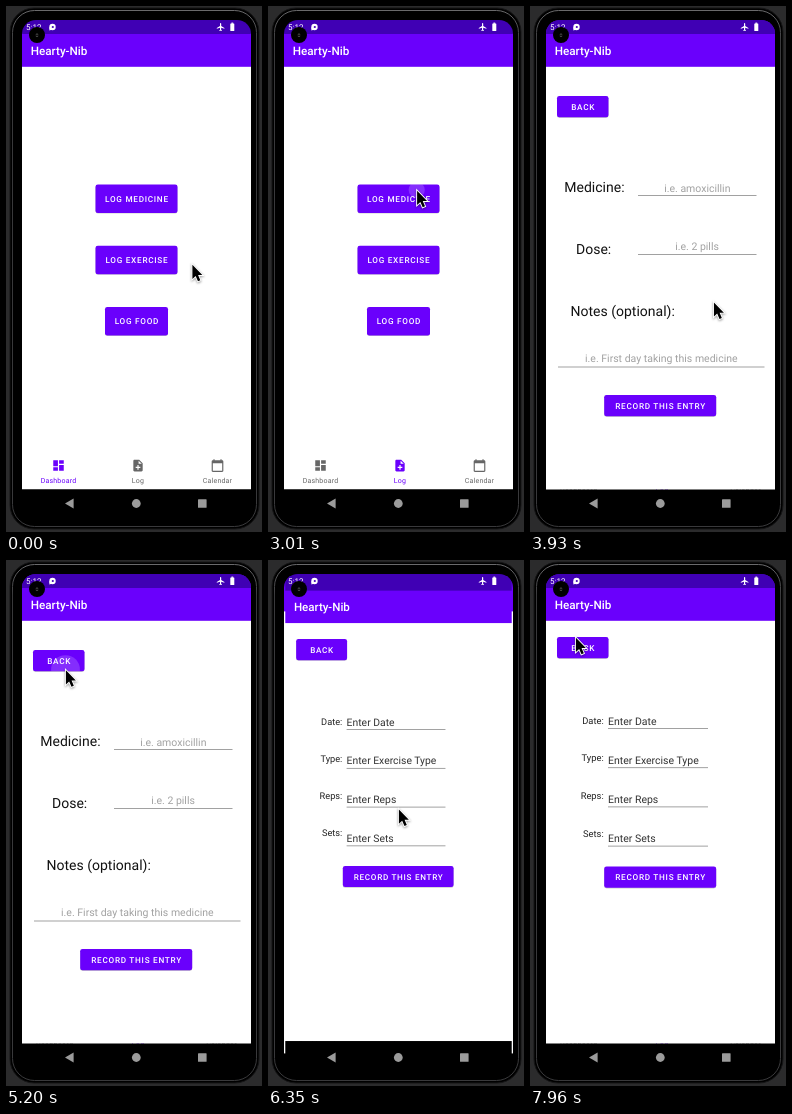
Write an HTML page that moves like this. It is 256 by 526 pixels and loops after 8 s.

```html
<!DOCTYPE html>
<html lang="en">
<head>
<meta charset="utf-8">
<title>Health log</title>
<style>
html, body { margin: 0; width: 100%; height: 100%; overflow: hidden; background: #2b2b2c; }
svg { display: block; width: 100vw; height: 100vh; font-family: Roboto, Arial, sans-serif; text-rendering: geometricPrecision; }
.caps { font-size: 8.2px; font-weight: 500; letter-spacing: .73px; fill: #fff; }
</style>
</head>
<body>
<svg id="stage" viewBox="0 0 256 526"></svg>
<script>
const PURPLE = '#6a00fc', DARK = '#4000b4', GREY = '#666';
const LOOP = 8000, CX = 130.5, CY = 264, NAV = 483.5;
const clamp = (v, a = 0, b = 1) => Math.min(b, Math.max(a, v));
const $ = id => document.getElementById(id);

// Pointer moves: start, end, x, y, sideways bow
const moves = [
  [1030, 1700, 121.5, 459, .07],
  [2150, 2650, 148.7, 184, .04],
  [3780, 4080, 140, 402, -.18],
  [4080, 4330, 112, 242, -.2],
  [4460, 4900, 59.5, 109.5, 0],
  [5420, 5740, 130.5, 248.7, 0],
  [6450, 6760, 163, 395.5, 0],
  [6800, 6860, 188, 341, 0],
  [6880, 7680, 58.5, 77, 0],
  [7700, 7960, 45.5, 77, .9]
];
function pointer(t) {
  let x = 186, y = 258;
  for (const [start, end, tx, ty, bow] of moves) {
    const k = clamp((t - start) / (end - start)), s = k * k * (3 - 2 * k);
    const side = bow * Math.sin(Math.PI * s), dx = tx - x, dy = ty - y;
    x += dx * s - dy * side;
    y += dy * s + dx * side;
  }
  return [x, y];
}

const rect = (x, y, w, h, fill, more = '') =>
  `<rect x="${x}" y="${y}" width="${w}" height="${h}" fill="${fill}" ${more}/>`;
const text = (x, y, size, str, fill = '#111', more = '') =>
  `<text x="${x}" y="${y}" font-size="${size}" fill="${fill}" ${more}>${str}</text>`;
const middle = 'text-anchor="middle"';
const rule = (x, w, y) => rect(x, y - .4, w, .8, '#8a8a8a');

// A touch ripple grows from the pointer and is clipped to the pressed box
const presses = [];
function ripple(t, box, fill = '#fff') {
  const [x, y] = pointer(t);
  presses.push(t);
  return `<clipPath id="clip${t}">${rect(...box, '#000', 'rx="2.3"')}</clipPath>
    <g clip-path="url(#clip${t})"><circle id="rip${t}" cx="${x}" cy="${y}" fill="${fill}"/></g>`;
}

const button = (x, y, w, h, label, press) =>
  rect(x, y + .6, w, h, '#000', 'rx="2.3" opacity=".2"') + rect(x, y, w, h, PURPLE, 'rx="2.3"') +
  `<text class="caps" x="${x + w / 2 + .4}" y="${y + h / 2 + 3.1}" ${middle}>${label}</text>` +
  (press ? ripple(press, [x, y, w, h]) : '');
const backButton = (y, press) => button(27, y, 51.5, 21.3, 'BACK', press);
const recordButton = y => button(74.2, y, 112, 21.3, 'RECORD THIS ENTRY');

const appWindow = (id, body) => `<g id="${id}">` +
  rect(16, 60, 229, NAV - 60, '#fff') + rect(16, 27, 229, 33.8, PURPLE) +
  rect(16, 14, 229, 14, DARK) + rect(16, NAV, 229, 514 - NAV, '#000') +
  text(24.7, 49, 11.7, 'Hearty-Nib', '#fff', 'font-weight="500"') + body + '</g>';

const tab = (id, x, label, icon) => `<g id="${id}" fill="${GREY}">
  <path transform="translate(${x - 7} 452.6) scale(.584)" d="${icon}"/>
  <text x="${x}" y="476.6" font-size="7" letter-spacing=".2" ${middle}>${label}</text></g>`;

const home = appWindow('home',
  button(89.5, 178.5, 82, 28.5, 'LOG MEDICINE', 3010) +
  button(89.5, 239.7, 82, 28.5, 'LOG EXERCISE', 6060) +
  button(99, 301, 63, 28.5, 'LOG FOOD') +
  ripple(2000, [16, 451, 229, 32], '#9c94ac') +
  tab('dash', 52.5, 'Dashboard', 'M3 13h8V3H3zm0 8h8v-6H3zm10 0h8V11h-8zm0-18v6h8V3z') +
  tab('log', 132, 'Log', 'M14 2H6c-1.1 0-2 .9-2 2v16c0 1.1.9 2 2 2h12c1.1 0 2-.9 2-2V8zm2 14h-3v3h-2v-3H8v-2h3v-3h2v3h3zm-3-7V3.5L18.5 9z') +
  tab('cal', 211.5, 'Calendar', 'M20 3h-1V1h-2v2H7V1H5v2H4c-1.1 0-2 .9-2 2v16c0 1.1.9 2 2 2h16c1.1 0 2-.9 2-2V5c0-1.1-.9-2-2-2zm0 18H4V8h16z'));

const hint = (x, y, str) => text(x, y, 10.5, str, '#a2a2a2', middle);
const medicine = appWindow('medicine',
  backButton(90, 5140) +
  text(34.3, 186.3, 14, 'Medicine:') + hint(167.3, 185.6, 'i.e. amoxicillin') + rule(108, 118.5, 189.5) +
  text(46, 247.6, 14, 'Dose:') + hint(167, 244.4, 'i.e. 2 pills') + rule(108, 118.5, 248.5) +
  text(40.5, 309.6, 14, 'Notes (optional):') +
  hint(131.3, 356, 'i.e. First day taking this medicine') + rule(28, 206.5, 361) +
  recordButton(389));

const fields = ['Date:Enter Date', 'Type:Enter Exercise Type', 'Reps:Enter Reps', 'Sets:Enter Sets'];
const exercise = appWindow('exercise',
  backButton(77) +
  fields.map((field, i) => {
    const [label, value] = field.split(':'), y = 164.5 + i * 39.2;
    return text(73.7, y - 1 - i * 1.5, 9.34, label + ':', '#222', 'text-anchor="end"') +
      text(78, y, 10.5, value, '#333') + rule(78, 100, y + 4);
  }).join('') +
  recordButton(306.5));

const system =
  text(20, 24, 8, '5:12', '#fff') +
  '<circle cx="46.5" cy="21" r="3.2" fill="#fff"/><path d="M43.4 21v3.6l3-1z" fill="#fff"/>' +
  `<circle cx="46.8" cy="21" r="1.1" fill="${DARK}"/>` +
  '<path transform="translate(210 16.3) scale(.4)" fill="#fff" d="M21 16v-2l-8-5V3.5a1.5 1.5 0 0 0-3 0V9l-8 5v2l8-2.5V19l-2 1.5V22l3.5-1 3.5 1v-1.5L13 19v-5.5z"/>' +
  rect(224.3, 17.5, 4, 7.4, '#fff', 'rx=".5"') + rect(225.4, 16.6, 1.8, 1.2, '#fff') +
  '<circle cx="31" cy="29" r="8" fill="#000"/>' +
  '<path d="M29.8 28.5q1.2-1.2 2.4 0M29.8 30q1.2 1 2.4 0" stroke="#777" stroke-width=".7" fill="none"/>' +
  '<g fill="#9b9b9b"><path d="M59 497.5L67.6 492.5V502.5Z"/><circle cx="130.3" cy="497.5" r="4.4"/></g>' +
  rect(192, 493.2, 8.6, 8.6, '#9b9b9b', 'rx=".6"');

$('stage').innerHTML =
  '<linearGradient id="rim" x2="0" y2="1"><stop stop-color="#6a6a6c"/><stop offset=".06" stop-color="#39393b"/><stop offset="1" stop-color="#39393b"/></linearGradient>' +
  rect(4, 2, 249, 521, '#000', 'rx="24" stroke="#161617"') +
  rect(6.5, 4.5, 244, 516, '#000', 'rx="22" stroke="url(#rim)"') +
  '<clipPath id="screen">' + rect(16, 14, 229, 500, '#000', 'rx="14"') + '</clipPath>' +
  `<g clip-path="url(#screen)">${home}${medicine}${exercise}</g>${system}` +
  `<g id="cursor"><path d="M0 0V15.2L3.5 12L6 17.7L8.500 16.6L6.1 11H10.7Z" transform="translate(.4 .8) scale(.93)"
    fill="#000" stroke="#fff" stroke-width="2" paint-order="stroke" style="filter:drop-shadow(0 1px 1px #0006)"/></g>`;

// Fast out, extra slow in: two joined cubic curves
const cubic = (a, b, c, d, u) =>
  a * (1 - u) ** 3 + 3 * b * u * (1 - u) ** 2 + 3 * c * u * u * (1 - u) + d * u ** 3;
function ease(x) {
  x = clamp(x);
  const [xs, ys] = x < 1 / 6
    ? [[0, .05, .13333, 1 / 6], [0, 0, .06, .4]]
    : [[1 / 6, .20833, .25, 1], [.4, .82, 1, 1]];
  let lo = 0, hi = 1;
  for (let i = 0; i < 24; i++) {
    const u = (lo + hi) / 2;
    if (cubic(...xs, u) < x) lo = u; else hi = u;
  }
  return cubic(...ys, hi);
}

const forms = [
  { id: 'medicine', open: 3130, close: 5260 },
  { id: 'exercise', open: 6180, close: Infinity }
];
const zoom = (id, s) =>
  $(id).setAttribute('transform', `translate(${CX} ${CY}) scale(${s}) translate(${-CX} ${-CY})`);

function draw(t) {
  let homeScale = 1;
  for (const { id, open, close } of forms) {
    const a = t - open, b = t - close, closing = b >= 0;
    const p = ease((closing ? b : a) / 400);
    if (a >= 0) homeScale = closing ? 1.1 - .1 * p : 1 + .05 * p;
    zoom(id, closing ? 1 - .1 * p : .85 + .15 * p);
    $(id).setAttribute('opacity', closing ? clamp((85 - b) / 50) : clamp((a - 50) / 50));
  }
  zoom('home', homeScale);

  for (const press of presses) {
    const k = (t - press) / 450;
    $('rip' + press).setAttribute('r', 8 + 47 * clamp(k));
    $('rip' + press).setAttribute('opacity', k >= 0 && k < 1 ? .18 * (1 - k * k) : 0);
  }

  $('dash').setAttribute('fill', t < 2000 ? PURPLE : GREY);
  $('log').setAttribute('fill', t < 2000 ? GREY : PURPLE);
  $('cursor').setAttribute('transform', `translate(${pointer(t)})`);
}

function tick() {
  draw(performance.now() % LOOP);
  requestAnimationFrame(tick);
}
tick();
</script>
</body>
</html>
```
